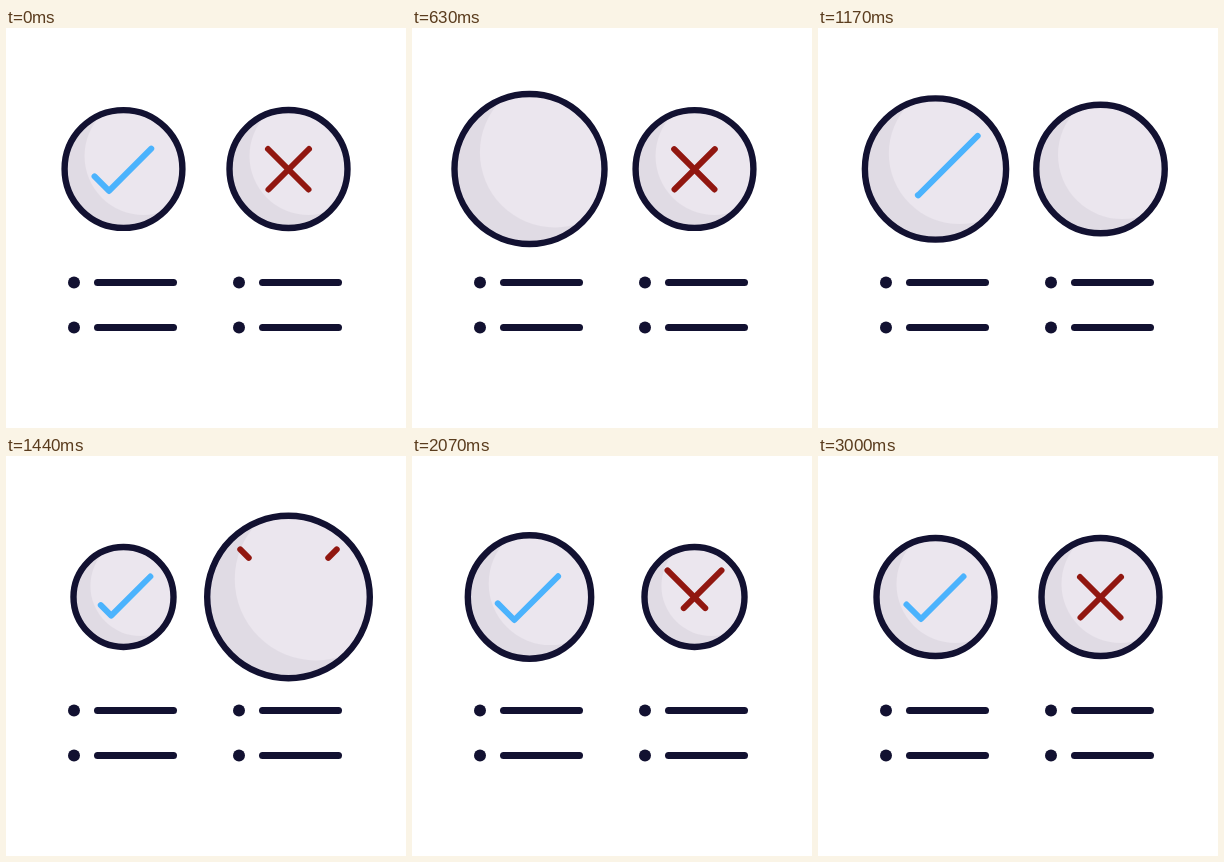
Recreate the animation shown at these times as an HTML page with a canvas. Size 400 by 400 pixels, loop 3090 ms.

```html
<!DOCTYPE html>
<html lang="en">
<head>
<meta charset="utf-8">
<title>Pros and cons</title>
<style>
  html, body { margin: 0; width: 100%; height: 100%; overflow: hidden; background: #fff; }
  canvas { display: block; width: 400px; height: 400px; }
</style>
</head>
<body>
<canvas id="stage" width="400" height="400"></canvas>
<script>
const ctx = document.getElementById('stage').getContext('2d');
const LOOP = 3090;
const DELAY = 630;
const RADIUS = 59;
const INK = '#121131', LIGHT = '#ebe6ee', SHADE = '#e0dbe4', BLUE = '#4bb3fd', RED = '#911710';

const out = power => u => 1 - Math.pow(1 - u, power);
const swing = u => (1 - Math.cos(Math.PI * u)) / 2;

// Each key is [time, value, easing towards it].
function track(keys, t) {
  if (t <= keys[0][0]) return keys[0][1];
  for (let i = 1; i < keys.length; i++) {
    const [t0, v0] = keys[i - 1];
    const [t1, v1, ease = swing] = keys[i];
    if (t < t1) return v0 + (v1 - v0) * ease((t - t0) / (t1 - t0));
  }
  return keys[keys.length - 1][1];
}

const bounce = (peak, rebound) => [
  [0, 0], [420, -12.2, out(3)], [950, peak, out(2.6)],
  [1445, -9], [1930, rebound], [2370, 0]
];
const leftBounce = bounce(26.3, 3.5);
const rightBounce = bounce(23.4, 4);

// Distances travelled along a stroke by its two ends.
const tick = {
  rest: [8, 65], gone: 400, enter: 760,
  tail: [[1000, 0], [1900, 8.9], [2400, 8]],
  head: [[760, 0], [1500, 63.2, out(2)], [1950, 66.6], [2400, 65]]
};
const cross = {
  rest: [14.5, 55], gone: 1040, enter: 1375, begin: DELAY,
  tail: [[1880, 0], [2560, 17.2], [3000, 14.5]],
  head: [[1375, 0], [2560, 58, out(1.95)], [3000, 55]]
};

function ends(part, t) {
  const [a, b] = part.rest;
  if (t < part.gone) return [track([[part.begin || 0, a], [part.gone, b, out(1.5)]], t), b];
  if (t < part.enter) return [0, 0];
  return [track(part.tail, t), track(part.head, t)];
}

function disc(x, y, r, fill) {
  ctx.beginPath();
  ctx.arc(x, y, r, 0, 2 * Math.PI);
  ctx.fillStyle = fill;
  ctx.fill();
}

function line(points, color, width) {
  ctx.beginPath();
  points.forEach(([x, y]) => ctx.lineTo(x, y));
  ctx.strokeStyle = color;
  ctx.lineWidth = width;
  ctx.stroke();
}

function badge(x, y, r) {
  const k = r / RADIUS;
  ctx.save();
  disc(x, y, r, SHADE);
  ctx.clip();
  disc(x + 20 * k, y - 13 * k, r, LIGHT);
  ctx.restore();
  ctx.beginPath();
  ctx.arc(x, y, r, 0, 2 * Math.PI);
  ctx.strokeStyle = INK;
  ctx.lineWidth = 6.4;
  ctx.stroke();
}

function drawTick(x, y, k, [tail, head]) {
  if (head <= tail) return;
  const bend = 50.5;
  const at = d => [x + k * (36 - d), y + k * (22 - Math.abs(bend - d))];
  const points = [at(tail)];
  if (tail < bend && head > bend) points.push(at(bend));
  points.push(at(head));
  line(points, BLUE, 6);
}

function drawCross(x, y, k, [tail, head]) {
  if (head <= tail) return;
  for (const side of [-1, 1]) {
    const at = d => [x + side * k * (35 - d), y + k * (d - 34.5)];
    line([at(tail), at(head)], RED, 6);
  }
}

function list(x) {
  for (const y of [254.5, 299.5]) {
    disc(x, y, 6, INK);
    line([[x + 23.5, y], [x + 99.5, y]], INK, 7);
  }
}

function draw(t) {
  ctx.fillStyle = '#fff';
  ctx.fillRect(0, 0, 400, 400);
  ctx.lineCap = ctx.lineJoin = 'round';
  list(68);
  list(233);

  const left = RADIUS + track(leftBounce, t);
  badge(117.5, 141, left);
  drawTick(117.5, 141, left / RADIUS, ends(tick, t));

  const right = RADIUS + track(rightBounce, t - DELAY);
  badge(282.5, 141, right);
  drawCross(282.5, 141, right / RADIUS, ends(cross, t));
}

const start = performance.now();
function frame() {
  draw((performance.now() - start) % LOOP);
  requestAnimationFrame(frame);
}
frame();
</script>
</body>
</html>
```
